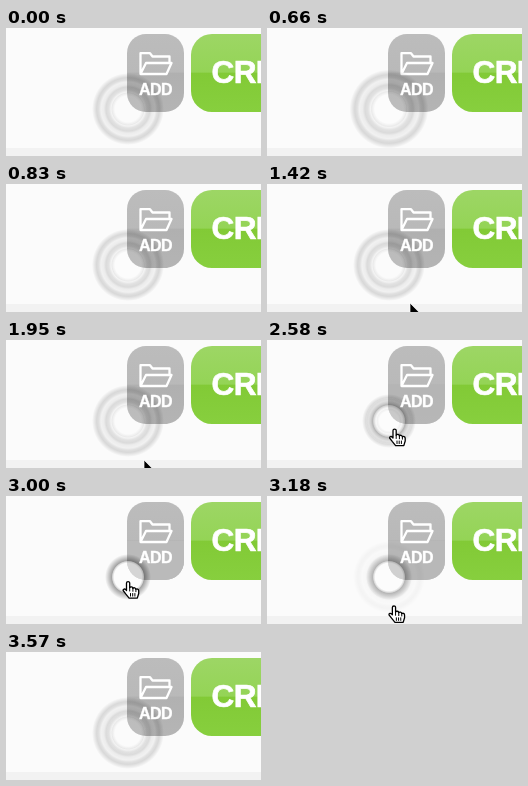
An HTML page that plays this animation: 255x128 px, repeating every 8000 ms.

```html
<!DOCTYPE html>
<html lang="en">
<head>
<meta charset="utf-8">
<title>Add button</title>
<style>
  html, body { margin: 0; width: 100%; height: 100%; overflow: hidden; background: #fbfbfb; }
  svg { display: block; width: 100vw; height: 100vh; }
  text { font-family: "Liberation Sans", Arial, sans-serif; font-weight: bold; fill: #fff; stroke: #fff; }
</style>
</head>
<body>
<svg viewBox="0 0 255 128">
  <defs>
    <linearGradient id="grey" x2="0" y2="1">
      <stop offset="0" stop-color="#bcbcbc"/><stop offset=".49" stop-color="#b9b9b9"/>
      <stop offset=".5" stop-color="#b0b0b0"/><stop offset="1" stop-color="#b4b4b4"/>
    </linearGradient>
    <linearGradient id="green" x2="0" y2="1">
      <stop offset="0" stop-color="#9dd665"/><stop offset=".49" stop-color="#94d456"/>
      <stop offset=".5" stop-color="#82ca36"/><stop offset="1" stop-color="#87cf3e"/>
    </linearGradient>
    <radialGradient id="band" gradientUnits="userSpaceOnUse" cx="0" cy="0" r="36">
      <stop offset=".36" stop-opacity="0"/>
      <stop offset=".44" stop-opacity=".07"/>
      <stop offset=".47" stop-opacity=".03"/>
      <stop offset=".53" stop-opacity=".1"/>
      <stop offset=".61" stop-opacity=".13"/>
      <stop offset=".67" stop-opacity=".06"/>
      <stop offset=".75" stop-opacity=".04"/>
      <stop offset=".81" stop-opacity=".11"/>
      <stop offset=".87" stop-opacity=".14"/>
      <stop offset="1" stop-opacity="0"/>
    </radialGradient>
    <radialGradient id="shade" gradientUnits="userSpaceOnUse" cx="0" cy="0" r="23">
      <stop offset=".6" stop-opacity="0"/>
      <stop offset=".7" stop-opacity=".36"/>
      <stop offset="1" stop-opacity="0"/>
    </radialGradient>
  </defs>

  <rect width="255" height="128" fill="#fbfbfb"/>
  <rect y="120" width="255" height="8" fill="#f2f2f2"/>

  <rect x="121" y="6" width="57" height="78" rx="19" fill="url(#grey)"/>
  <path id="hover" d="M121 45h57v20a19 19 0 0 1-19 19h-19a19 19 0 0 1-19-19z" fill="#bababa"/>
  <rect x="185" y="6" width="190" height="78" rx="21" fill="url(#green)"/>
  <path d="M134.5 46V25.2h9.5l2.5 3.3h17V35M134.5 46l5.5-11h25.5l-5 11z"
        fill="none" stroke="#fff" stroke-width="2.3" stroke-linejoin="round"/>

  <g id="ring">
    <circle id="outer" r="36" fill="url(#band)"/>
    <circle id="dark" r="23" fill="url(#shade)"/>
    <circle id="disc" r="16" fill="#fff"/>
  </g>

  <text x="133" y="67" font-size="16" letter-spacing="-.5" stroke-width=".4">ADD</text>
  <text x="205.5" y="55.3" font-size="31.5" letter-spacing="-.6" stroke-width=".7">CREATE</text>

  <path id="arrow" d="M0 0V15.5L3.5 12.2 6 18 8.5 17 6 11.2H11Z" fill="#000" stroke="#fff" stroke-width=".7"/>
  <g id="hand" stroke-linejoin="round" stroke-linecap="round">
    <path d="M0 1.6C0-.3 3.2-.3 3.2 1.6V6.2C3.8 5 6.2 5.2 6.4 6.8 7.2 5.8 9.2 6.2 9.4 7.8 10.4 7 12.2 7.6 12.2 9.2V12L10.8 16.6H2.6L-.8 12.4-3.4 9C-3.6 7.4-1.8 7-.6 8.2L0 9Z"
          fill="#fff" stroke="#000" stroke-width="1.3"/>
    <path d="M3.2 6.2V9.5M6.4 6.8V9.8M9.4 7.8V10.2M4 12v2.6M6.2 12v2.6M8.4 12v2.6" fill="none" stroke="#000"/>
  </g>
</svg>
<script>
const LOOP = 8000, STEP = 57.5;
const el = id => document.getElementById(id);
const clamp = v => Math.max(0, Math.min(1, v));
const mix = (a, b, k) => a + (b - a) * k;
const ease = k => k * k * (3 - 2 * k);
const easeOut = k => 1 - (1 - k) ** 1.6;

// Movement advances in even steps from each start time.
const part = (t, from, to) => t < from ? 0
  : clamp((Math.floor((t - from) / STEP + .02) + 1) * STEP / (to - from + STEP));

// Stops are [time, x, y].
const visits = [
  [[1420, 143, 119], [1535, 141, 111], [1650, 136, 115], [1770, 135, 129]],
  [[1950, 138, 120], [2410, 138, 120], [2470, 134, 108], [2580, 126, 89], [2820, 120.5, 85.5],
   [3000, 120.5, 85.5], [3120, 123, 100], [3290, 130, 129]]
];

function cursorAt(t) {
  const path = visits.find(p => t >= p[0][0] && t < p[p.length - 1][0]);
  if (!path) return null;
  const i = path.findIndex(p => p[0] > t);
  const a = path[i - 1], b = path[i];
  const k = clamp(Math.floor((t - a[0]) / STEP + .02) * STEP / (b[0] - a[0]));
  return [mix(a[1], b[1], k), mix(a[2], b[2], k)];
}

function place(id, p) {
  el(id).setAttribute("visibility", p ? "visible" : "hidden");
  if (p) el(id).setAttribute("transform", `translate(${p})`);
}

function draw(t) {
  const beat = t < 890 ? Math.sin(Math.PI * part(t, 600, 833)) : 0;
  const shrink = easeOut(part(t, 2410, 2820));
  const back = ease(part(t, 3060, 3570));
  const press = shrink * (1 - back);

  el("ring").setAttribute("transform", `translate(122 81) scale(${1 + .1 * beat})`);
  el("outer").setAttribute("transform", `scale(${t < 3000 ? mix(1, .52, shrink) : 1})`);
  el("outer").setAttribute("opacity", t < 3000 ? 1 - shrink ** 3 : back);
  el("dark").setAttribute("opacity", press);
  el("disc").setAttribute("opacity", mix(.12, .4, press));
  el("hover").setAttribute("opacity", press);

  const p = cursorAt(t);
  const pointing = t >= 2470 && t < 3230;
  place("arrow", pointing ? null : p);
  place("hand", pointing ? p : null);
}

const start = performance.now();
function tick() {
  draw((performance.now() - start) % LOOP);
  requestAnimationFrame(tick);
}
draw(0);
requestAnimationFrame(tick);
</script>
</body>
</html>
```
